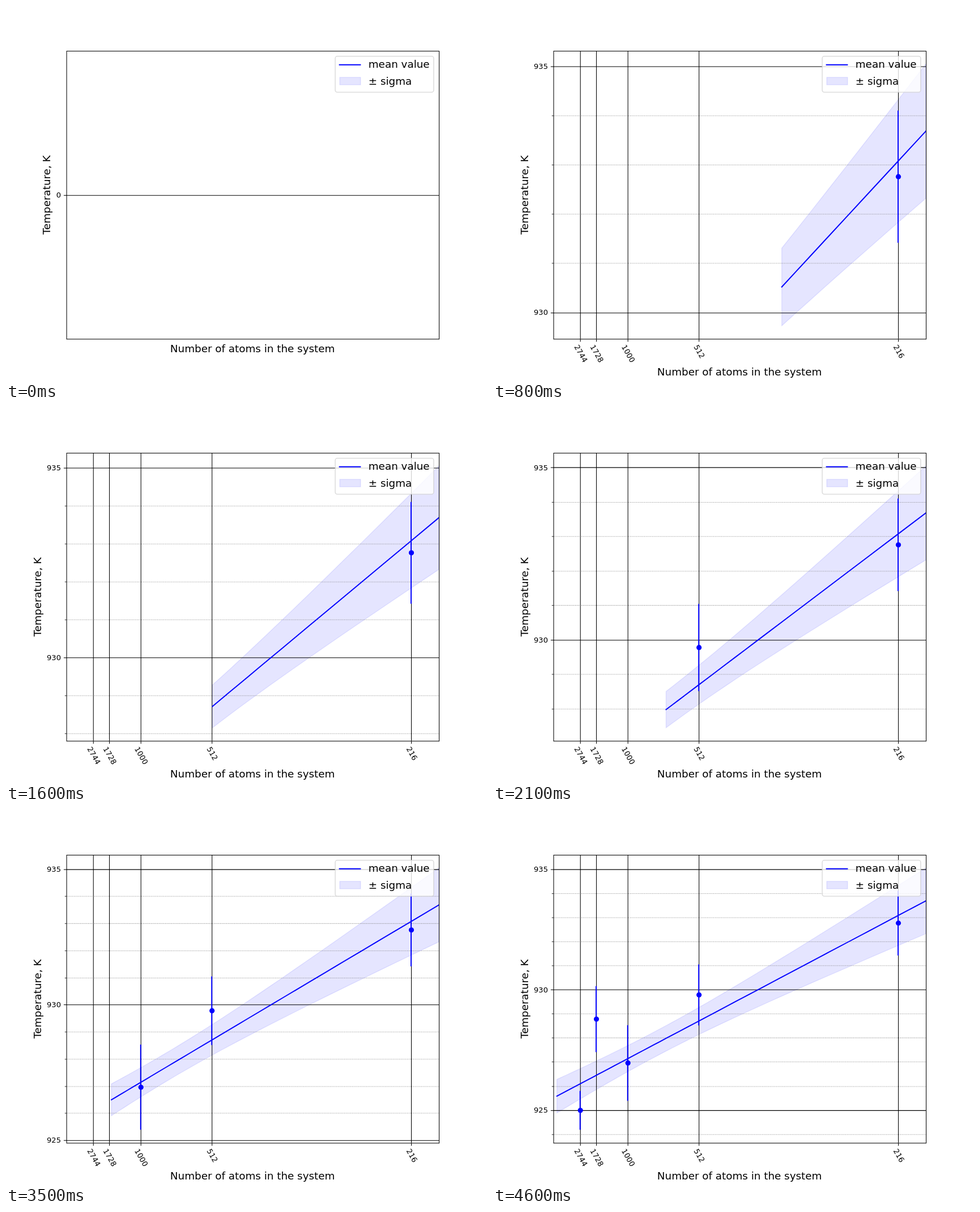
Recreate the animation shown at these times as an HTML page. Size 849x660 px, loop 4.7 s.

```html
<!DOCTYPE html>
<html lang="en">
<head>
<meta charset="utf-8">
<title>Temperature against system size</title>
<style>
  html, body { margin: 0; width: 100%; height: 100%; overflow: hidden; background: #fff; }
  svg { display: block; font-family: "DejaVu Sans", sans-serif; font-size: 19.44px; }
  .tick { font-size: 13.89px; }
  .axis { stroke: #000; stroke-width: 1.11; fill: none; }
  .minor { stroke: #000; stroke-width: .83; }
  .dots { stroke: #808080; stroke-width: 1.11; stroke-dasharray: 1.11 1.83; }
  .band { fill: #00f; stroke: #00f; stroke-width: 1.39; fill-opacity: .1; stroke-opacity: .1; }
  .mean { stroke: #00f; stroke-width: 2.08; fill: none; stroke-linecap: square; }
  .bar { stroke: #00f; stroke-width: 2.08; }
  .dot { fill: #00f; }
</style>
</head>
<body>
<!-- laid out at 900 by 700, shown slightly smaller -->
<svg width="849" height="660" viewBox="0 0 900 700" preserveAspectRatio="none">
  <defs><clipPath id="area"><rect x="113" y="84" width="697" height="539"/></clipPath></defs>
  <g id="plot" clip-path="url(#area)"></g>
  <g id="ticks"></g>
  <rect class="axis" x="113.5" y="84.5" width="697" height="539"/>
  <text id="xlabel" x="461.25" text-anchor="middle">Number of atoms in the system</text>
  <text id="ylabel" text-anchor="middle">Temperature, K</text>
  <g id="legend">
    <rect x="616" y="94" width="184.3" height="67.4" rx="3.9" fill="#fff" fill-opacity=".8" stroke="#ccc" stroke-opacity=".8" stroke-width="1.39"/>
    <path class="mean" d="M624 110H663"/>
    <rect class="band" x="624.5" y="133.5" width="39" height="14"/>
    <text x="678.2" y="116">mean value</text>
    <text x="678.2" y="147">± sigma</text>
  </g>
</svg>
<script>
const STEP = 100, COUNT = 47;
const LEFT = 112.5, RIGHT = 810, TOP = 84, BOTTOM = 623;
const MIDDLE = (TOP + BOTTOM) / 2;
const UNIT = (RIGHT - LEFT) / .005; // pixels per 1/N
const $ = id => document.getElementById(id);

// atoms, temperature, error
const points = [
  [216, 932.757, 1.342], [512, 929.778, 1.266], [1000, 926.955, 1.57],
  [1728, 928.775, 1.37], [2744, 924.99, .805]
];

// sample spacing widens away from zero: [index, extra distance]
const extra = [[0, 54], [3, 35.9], [11, 13.9], [20, 4.3], [26, 1.56], [34, .14], [45, .02]];

function sample(i) {
  const k = Math.max(1, extra.findIndex(e => e[0] >= i));
  const [a, p] = extra[k - 1], [b, q] = extra[k];
  return (46 - i + p * Math.pow(q / p, (i - a) / (b - a))) * 5e-5;
}

function fit(x) {
  const u = x * 1000;
  const mean = 925.497 + 1.637 * u;
  const sigma = Math.sqrt(.2756 + .12 * (u - 1.37) ** 2);
  return { x, mean, hi: mean + sigma, lo: mean - sigma };
}

const curve = Array.from({ length: COUNT - 1 }, (_, i) => fit(sample(i)));
const px = x => LEFT + x * UNIT;
const snap = v => Math.round(v) + .5;
const hline = (cls, y, a, b) => `<path class="${cls}" d="M${a} ${y}H${b}"/>`;
const vline = (cls, x, a, b) => `<path class="${cls}" d="M${x} ${a}V${b}"/>`;
const join = list => list.map(p => p.map(v => v.toFixed(2)).join(" ")).join("L");

function yTick(y, text) {
  return hline("axis", snap(y), 108, 113.5) +
    `<text class="tick" x="102.8" y="${y + 5}" text-anchor="end">${text}</text>`;
}

function xTick(n) {
  const x = px(1 / n), w = String(n).length * 8.84;
  const y = 632.7 + (w * .866 + 6.5) / 2;
  return vline("axis", snap(x), 623.5, 628.5) +
    `<text class="tick" transform="translate(${x} ${y}) rotate(60)" y="3.5" text-anchor="middle">${n}</text>`;
}

function place(xBase, yBase) {
  $("xlabel").setAttribute("y", xBase);
  $("ylabel").setAttribute("transform", `translate(${yBase} ${MIDDLE}) rotate(-90)`);
}

function drawEmpty() {
  place(648, 83);
  $("plot").innerHTML = hline("axis", snap(MIDDLE), LEFT, RIGHT);
  $("ticks").innerHTML = yTick(MIDDLE, 0);
}

function draw(n) {
  if (!n) return drawEmpty();
  place(691, 66);
  const part = curve.slice(0, n), tip = part[n - 1].x;
  const shown = points.filter(p => 1 / p[0] >= tip);

  // value limits with a 5% margin
  const lows = [...part.map(p => p.lo), ...shown.map(p => p[1] - p[2])];
  const highs = [...part.map(p => p.hi), ...shown.map(p => p[1] + p[2])];
  const min = Math.min(...lows), max = Math.max(...highs), pad = (max - min) * .05;
  const scale = (BOTTOM - TOP) / (max - min + 2 * pad);
  const py = v => TOP + (max + pad - v) * scale;

  const trace = key => part.map(p => [px(p.x), py(p[key])]);
  let plot = `<path class="band" d="M${join([...trace("hi"), ...trace("lo").reverse()])}Z"/>`;
  let ticks = "";
  for (const [atoms] of points) {
    plot += vline("axis", snap(px(1 / atoms)), TOP, BOTTOM);
    ticks += xTick(atoms);
  }
  for (let v = Math.ceil(min - pad); v <= max + pad; v++) {
    const y = py(v), major = v % 5 === 0;
    plot += hline(major ? "axis" : "dots", snap(y), LEFT, RIGHT);
    ticks += major ? yTick(y, v) : hline("minor", snap(y), 110, 113.5);
  }
  if (n > 1) plot += `<path class="mean" d="M${join(trace("mean"))}"/>`;
  for (const [atoms, t, err] of shown) {
    const x = px(1 / atoms);
    plot += vline("bar", Math.round(x), py(t + err), py(t - err)) +
      `<circle class="dot" cx="${snap(x)}" cy="${py(t)}" r="4.86"/>`;
  }
  $("plot").innerHTML = plot;
  $("ticks").innerHTML = ticks;
}

let last = -1;
function tick() {
  const n = Math.floor(performance.now() / STEP) % COUNT;
  if (n !== last) draw(last = n);
  requestAnimationFrame(tick);
}
tick();
</script>
</body>
</html>
```
